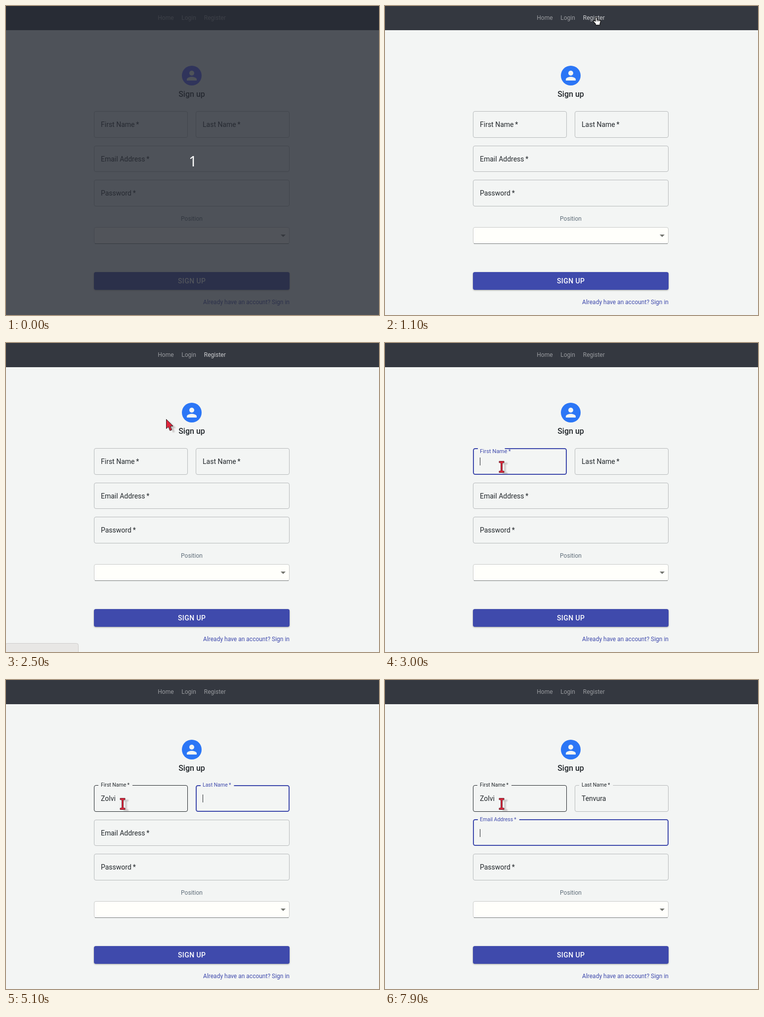
Write an HTML page with a canvas that moves like this. It is 755x626 px and loops after 8000 ms.

```html
<!DOCTYPE html>
<html lang="en">
<head>
<meta charset="utf-8">
<title>Sign up form</title>
<style>
  html, body { margin: 0; width: 100%; height: 100%; overflow: hidden; background: #f3f5f4; }
  canvas { display: block; width: 755px; height: 626px; }
</style>
</head>
<body>
<canvas id="stage"></canvas>
<script>
const W = 755, H = 626, LOOP = 8000, STEP = 100;
const BG = '#f3f5f4', INK = '#23282c', INDIGO = '#3f4aac', LINE = '#b7babb';

const canvas = document.getElementById('stage');
const ctx = canvas.getContext('2d');
const dpr = window.devicePixelRatio || 1;
canvas.width = W * dpr;
canvas.height = H * dpr;

const clamp = v => Math.max(0, Math.min(1, v));
const mix = (a, b, p) => a + (b - a) * p;
const smooth = p => p * p * (3 - 2 * p);
const easeOut = p => 1 - (1 - p) ** 2;

const fields = [
  { label: 'First Name', x: 178, y: 213, w: 190, h: 54, focus: 3000, blur: 5100, lift: [2900, 200],
    text: 'Zolvi', keys: [3900, 4100, 4200, 4400, 4500], caretOff: [3600, 3900] },
  { label: 'Last Name', x: 384, y: 213, w: 190, h: 54, focus: 5100, blur: 7600, lift: [4900, 200],
    text: 'Tenvura', keys: [5700, 5900, 6100, 6300, 6500, 6500, 6700], caretOff: [5600, 5700, 7200, 7600] },
  { label: 'Email Address', x: 178, y: 283, w: 396, h: 53, focus: 7600, blur: LOOP, lift: [7570, 300] },
  { label: 'Password', x: 178, y: 352, w: 396, h: 54, focus: Infinity, blur: Infinity }
];

// time, x, y of the pointer's hot spot
const route = [
  [2200, 427, 23], [2300, 405, 54], [2400, 365, 105], [2500, 324, 154],
  [2600, 290, 190], [2700, 262, 222], [2800, 243, 243], [2900, 236, 251]
];

function text(str, x, y, size, color, { weight = 400, align = 'left', family = 'Roboto', spacing = 0 } = {}) {
  ctx.font = `${weight} ${size}px ${family}, sans-serif`;
  ctx.letterSpacing = spacing + 'px';
  ctx.textAlign = align;
  ctx.fillStyle = color;
  ctx.fillText(str, x, y);
  const width = ctx.measureText(str).width;
  ctx.letterSpacing = '0px';
  return width;
}

function rect(x, y, w, h, color) {
  ctx.fillStyle = color;
  ctx.fillRect(x, y, w, h);
}

function round(x, y, w, h, r) {
  ctx.beginPath();
  ctx.roundRect(x, y, w, h, r);
}

function circle(x, y, r, color) {
  ctx.beginPath();
  ctx.arc(x, y, r, 0, Math.PI * 2);
  ctx.fillStyle = color;
  ctx.fill();
}

function poly(points) {
  ctx.beginPath();
  points.forEach(([x, y]) => ctx.lineTo(x, y));
  ctx.closePath();
}

function pointerAt(t) {
  if (t < 500) return null;
  if (t < route[0][0]) {
    const p = smooth(clamp((t - 500) / 600));
    return { x: mix(517, 427, p), y: mix(62, 23, p) };
  }
  const i = route.findIndex(k => k[0] > t);
  const [, x, y] = i < 0 ? route[route.length - 1] : route[i - 1];
  return { x, y };
}

function drawNav(t, pointer) {
  rect(0, 0, W, 49, '#343840');
  const hot = (pointer && pointer.x < 449 && pointer.y < 36) || (t >= 2200 && t < 2600);
  text('Home', 307.3, 28, 12, '#999b9f');
  text('Login', 355.2, 28, 12, '#999b9f');
  text('Register', 400.8, 28, 12, hot ? '#cdced0' : '#999b9f');
}

function drawAvatar(color) {
  circle(376, 141, 20, color);
  circle(376, 136, 5, BG);
  ctx.beginPath();
  ctx.moveTo(376, 143.5);
  ctx.bezierCurveTo(372.7, 143.5, 366, 145.2, 366, 148.5);
  ctx.lineTo(366, 151);
  ctx.lineTo(386, 151);
  ctx.lineTo(386, 148.5);
  ctx.bezierCurveTo(386, 145.2, 379.3, 143.5, 376, 143.5);
  ctx.fill();
}

function drawField(f, t, pointer) {
  const focused = t >= f.focus && t < f.blur;
  const hover = pointer && t >= route[0][0] && pointer.x > f.x && pointer.x < f.x + f.w &&
    pointer.y > f.y && pointer.y < f.y + f.h;
  const lift = t >= f.focus ? easeOut(clamp((t - f.lift[0]) / f.lift[1])) : 0;
  const thick = focused ? 2 : 1;
  const top = focused && f.h === 53 ? f.y - 1 : f.y;
  const base = f.y + 32;
  const left = f.x + 14;

  round(f.x + thick / 2, top + thick / 2, f.w - thick, f.y + f.h - top - thick, 3.5);
  ctx.lineWidth = thick;
  ctx.strokeStyle = focused ? INDIGO : hover ? INK : LINE;
  ctx.stroke();

  const size = mix(14, 10.5, lift);
  ctx.font = `400 ${size}px Roboto, sans-serif`;
  const width = ctx.measureText(f.label).width + size * 0.63;
  if (lift > 0) {
    const start = f.x + (focused ? 10 : 9);
    rect(start, top - 1, (left + width + 6 - start) * lift, 4, BG);
  }
  const color = focused ? INDIGO : INK;
  const y = mix(base, f.y + 3, lift);
  const w = text(f.label, left, y, size, color);
  text('*', left + w + size * 0.2, y, size, color);

  const typed = f.text ? f.text.slice(0, f.keys.filter(k => k <= t).length) : '';
  const end = left + text(typed, left, base, 14, INK);
  const off = f.caretOff || [];
  const hidden = off.some((from, i) => i % 2 === 0 && t >= from && t < off[i + 1]);
  if (focused && !hidden) rect(Math.floor(end), f.y + 19, 1, 16, INK);
}

function drawSelect() {
  text('Position', 376, 435, 12, '#5f6d79', { align: 'center' });
  round(178.5, 448.5, 395, 33, 3.5);
  ctx.fillStyle = '#fffffb';
  ctx.fill();
  ctx.lineWidth = 1;
  ctx.strokeStyle = '#c9cbca';
  ctx.stroke();
  rect(180, 481, 392, 1, '#777b7d');
  poly([[556, 463], [566, 463], [561, 468]]);
  ctx.fillStyle = '#73756f';
  ctx.fill();
}

function drawButton() {
  ctx.save();
  ctx.shadowColor = 'rgba(0,0,0,.35)';
  ctx.shadowBlur = 3 * dpr;
  ctx.shadowOffsetY = dpr;
  round(178, 539, 396, 36, 4);
  ctx.fillStyle = INDIGO;
  ctx.fill();
  ctx.restore();
  text('SIGN UP', 348, 562, 14, '#fff', { weight: 500, spacing: 0.4 });
  text('Already have an account? Sign in', 574, 604, 12, INDIGO, { align: 'right' });
}

function drawStatus(t) {
  if (t < 1700 || t >= 2800) return;
  ctx.save();
  ctx.globalAlpha = clamp((t - 1600) / 300);
  round(-1.5, 608.5, 148, 24, 4);
  ctx.fillStyle = '#e8e7e5';
  ctx.fill();
  ctx.lineWidth = 1;
  ctx.strokeStyle = '#cecdcb';
  ctx.stroke();
  ctx.restore();
}

// Red pointers share one look: a soft shadow below an outlined shape
function redShape(points, dx, dy, outline) {
  ctx.save();
  ctx.translate(dx, dy);
  poly(points);
  ctx.filter = 'blur(1px)';
  ctx.fillStyle = 'rgba(90,70,70,.28)';
  ctx.fill();
  ctx.restore();
  poly(points);
  ctx.fillStyle = '#e0243a';
  ctx.fill();
  ctx.lineWidth = 1;
  ctx.strokeStyle = outline;
  ctx.stroke();
}

function drawArrow() {
  redShape([[0.5, 0.5], [0.5, 19.5], [4.8, 15.8], [8, 23.5], [11.6, 22], [8.6, 14.6], [14, 14.2]], 6, 4, '#2a2427');
}

function drawBeam() {
  const half = [[5, -11.5], [5, -8.5], [1.5, -8], [1.5, 8], [5, 8.5], [5, 11.5]];
  const other = half.map(([x, y]) => [-x, y]).reverse();
  redShape([...half, ...other], 7, 3, '#6b2a33');
}

function drawHand() {
  ctx.beginPath();
  ctx.moveTo(-1, 8);
  ctx.lineTo(-1, 1);
  ctx.quadraticCurveTo(0.5, -1.4, 2, 1);
  ctx.lineTo(2, 5);
  ctx.lineTo(7, 5.6);
  ctx.quadraticCurveTo(9.5, 6, 9.5, 8.5);
  ctx.lineTo(8, 13);
  ctx.lineTo(8, 15.5);
  ctx.lineTo(-0.5, 15.5);
  ctx.lineTo(-1, 13);
  ctx.lineTo(-5.3, 8.5);
  ctx.quadraticCurveTo(-5.3, 6.2, -3, 6.8);
  ctx.closePath();
  ctx.fillStyle = '#fff';
  ctx.fill();
  ctx.lineWidth = 1.2;
  ctx.lineJoin = 'round';
  ctx.strokeStyle = '#111';
  ctx.stroke();
  ctx.lineWidth = 0.8;
  ctx.beginPath();
  for (const x of [2, 4.4, 6.8]) {
    ctx.moveTo(x, 5.5);
    ctx.lineTo(x, 8.5);
  }
  ctx.stroke();
}

function drawPointer(p) {
  ctx.save();
  ctx.translate(Math.round(p.x), Math.round(p.y));
  if (p.x < 449 && p.x > 400 && p.y < 36) drawHand();
  else if (p.y > 213) drawBeam();
  else drawArrow();
  ctx.restore();
}

function drawCountdown() {
  rect(0, 0, W, H, 'rgba(38,42,50,.8)');
  text('1', 370, 324.5, 29, '#fff', { family: '"Noto Sans"' });
}

function draw(t) {
  const pointer = pointerAt(t);
  const counting = t < 300;
  ctx.setTransform(dpr, 0, 0, dpr, 0, 0);
  rect(0, 0, W, H, BG);
  drawNav(t, pointer);
  drawAvatar(counting ? '#5861ff' : '#2b76f6');
  text('Sign up', 376, 184, 16, INK, { weight: 500, align: 'center' });
  fields.forEach(f => drawField(f, t, pointer));
  drawSelect();
  drawButton();
  drawStatus(t);
  if (pointer) drawPointer(pointer);
  if (counting) drawCountdown();
}

const began = performance.now();
function tick() {
  const ms = (performance.now() - began) % LOOP;
  draw(Math.floor(ms / STEP) * STEP);
  requestAnimationFrame(tick);
}
tick();
</script>
</body>
</html>
```
